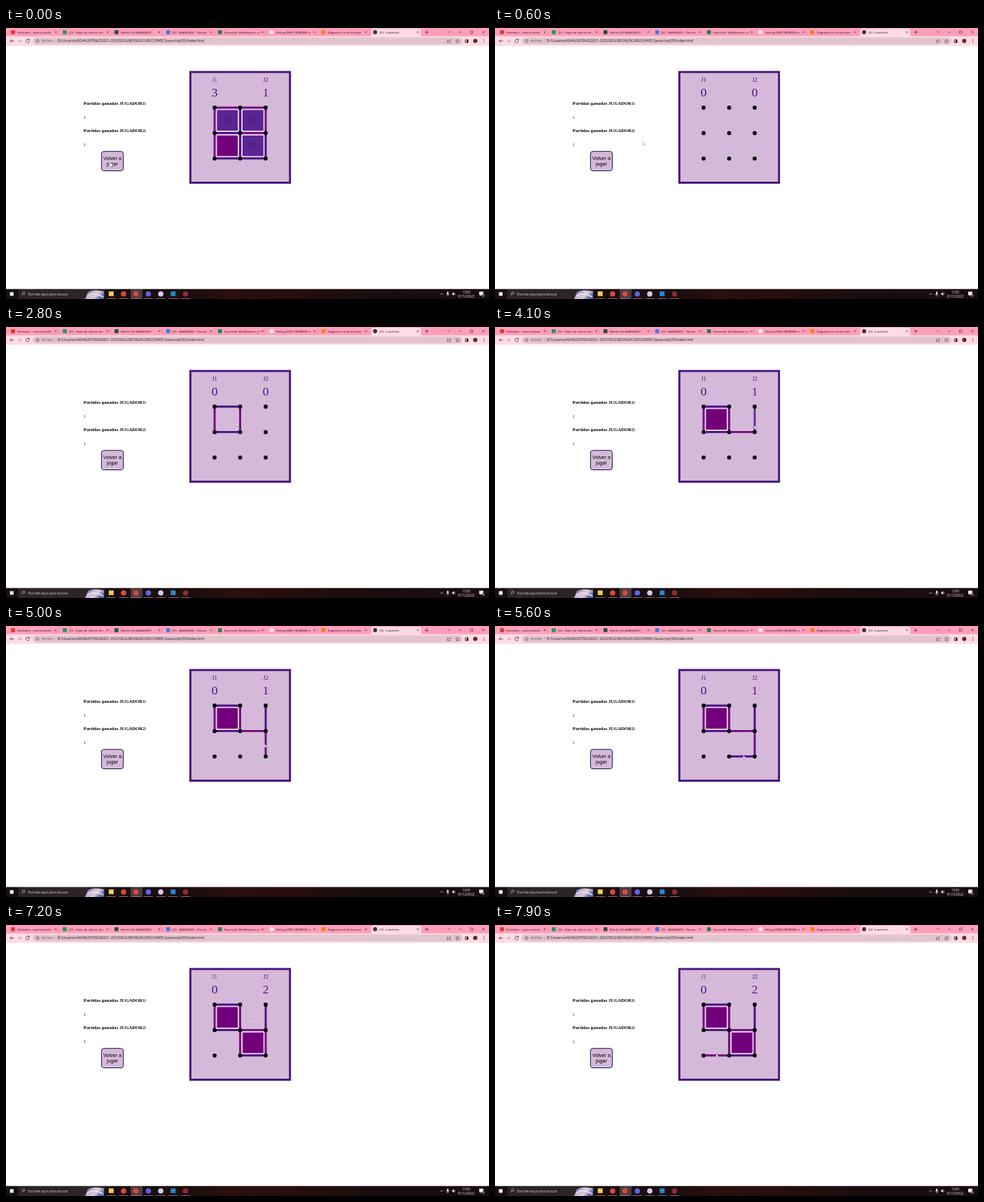
Write an HTML page that moves like this. It is 690 px wide and 388 px high and loops after 8000 ms.

```html
<!DOCTYPE html>
<html lang="es">
<head>
<meta charset="utf-8">
<title>JS3</title>
<style>
html, body { margin: 0; width: 100%; height: 100%; overflow: hidden; background: #fff; }
svg { display: block; width: 690px; height: 388px; }
text { white-space: pre; }
.ui { font-family: "Open Sans", "Noto Sans", sans-serif; }
.serif { font-family: "Liberation Serif", serif; }
.sans { font-family: "Liberation Sans", sans-serif; }
</style>
</head>
<body>
<svg id="stage" viewBox="0 0 690 388" xmlns="http://www.w3.org/2000/svg">
  <defs>
    <linearGradient id="bar"><stop offset="0" stop-color="#17100f"/><stop offset=".38" stop-color="#1b0e0f"/><stop offset=".46" stop-color="#2a0f0c"/><stop offset=".6" stop-color="#260e0d"/><stop offset=".75" stop-color="#190d0e"/><stop offset="1" stop-color="#180e10"/></linearGradient>
    <linearGradient id="doodle" x2="1" y2=".5"><stop offset="0" stop-color="#39406f"/><stop offset=".4" stop-color="#b9b2dd"/><stop offset=".7" stop-color="#e5cdd8"/><stop offset="1" stop-color="#5565b4"/></linearGradient>
  </defs>
  <rect width="690" height="388" fill="#fff"/>
  <g id="browser"></g>
  <g id="page"></g>
  <g id="board"></g>
  <g id="taskbar"></g>
  <g id="pointer"></g>
</svg>
<script>
const NS = 'http://www.w3.org/2000/svg';
const INDIGO = '#470f86', PURPLE = '#750580', LILAC = '#d4b9d9';
const LOOP = 8000, RESET = 300;
const $ = id => document.getElementById(id);

function add(parent, tag, attrs, content) {
  const el = document.createElementNS(NS, tag);
  for (const k in attrs) el.setAttribute(k, attrs[k]);
  if (content !== undefined) el.textContent = content;
  parent.appendChild(el);
  return el;
}
const label = (g, cls, x, y, size, fill, str, more) =>
  add(g, 'text', { class: cls, x, y, 'font-size': size, fill, ...more }, str);
const rect = (g, x, y, width, height, fill, more) =>
  add(g, 'rect', { x, y, width, height, fill, ...more });
const dot = (g, cx, cy, r, fill) => add(g, 'circle', { cx, cy, r, fill });
const stroke = (g, d, color, w = 0.7) =>
  add(g, 'path', { d, fill: 'none', stroke: color, 'stroke-width': w });
const MID = { 'text-anchor': 'middle' };

function drawBrowser(g) {
  const ink = '#3c1f28', strip = '#ff9ebb', tool = '#fedbe4';
  rect(g, 0, 0, 690, 12, strip);
  rect(g, 0, 11.8, 690, 13.7, tool);
  rect(g, 38, 13.4, 614, 10.2, '#e2c4ce', { rx: 5.1 });
  add(g, 'path', { d: 'M519.5 12q2.5 0 2.5-2.5v-6q0-2.500 2.500-2.500h66q2.500 0 2.500 2.500v6q0 2.500 2.500 2.500z', fill: tool });
  const tabs = [
    ['Recibidos - marisa.veldo(', '#d93a32'],
    ['JS3 - Hojas de cálculo de i', '#1a9e55'],
    ['Boletín JS3 AVANZADO', '#20553b'],
    ['JS3 - AVANZADO - Docum', '#3b7de0'],
    ['ExpressJS: Middlewares y r', '#23824d'],
    ['Editing DWEC/README.m', '#fbeef1', true],
    ['Diagrama sin título.trazo', '#ee8213'],
    ['JS3- Cuadrilete', '#3c3538', true]
  ];
  tabs.forEach(([name, color, round], i) => {
    const x = 10 + i * 73.9;
    if (round) dot(g, x, 6, 2.9, color);
    else rect(g, x - 2.8, 3.2, 5.6, 5.6, color);
    label(g, 'ui', x + 6.2, 7.5, 4.2, '#2d1219', name);
    const c = x + 61;
    rect(g, c - 2.3, 3, 6, 6, i === 7 ? tool : strip);
    stroke(g, `M${c - 1.3} 4.7l2.6 2.6m0-2.6l-2.6 2.6`, ink, 0.6);
    if (i < 6) stroke(g, `M${c + 4} 3v6`, '#c96f8a', 0.4);
  });
  stroke(g, 'M601 3.6v5m-2.5-2.5h5', ink);
  stroke(g, 'M631 4.7l1.8 1.8 1.8-1.8M647 6h3.8M663.5 4.3h3.4v3.4h-3.4zM680.3 4.2l3.4 3.4m0-3.4l-3.4 3.4', ink, 0.6);
  stroke(g, 'M11.5 18.6H6m2.3-2.3L6 18.6l2.3 2.3', ink);
  stroke(g, 'M17 18.6h5m-2.3-2.3l2.3 2.3-2.3 2.3', '#ad8290');
  stroke(g, 'M33 17a2.5 2.5 0 1 0 .4 2.2M33.5 15.6v2h-2', ink);
  stroke(g, 'M47.2 18.6a2.1 2.1 0 1 0-4.2 0 2.1 2.1 0 1 0 4.2 0M45.1 18.3v1.5M45.1 17.1v.6', ink, 0.5);
  label(g, 'ui', 50.7, 20.2, 4.82, '#634a52', 'Archivo');
  stroke(g, 'M71.3 16v5', '#a5848f', 0.4);
  label(g, 'ui', 74, 20.2, 4.82, '#2d1219',
    'B:/Usuarios/ADA%20ITS%202021-2023/SEGUNDO%20CURSO/DWEC/Javascript/JS3/index.html');
  stroke(g, 'M632 17.7h-1.5v3.2h4.6v-1.2M632 19.4q.5-2 3-2m-1-1.2l1.4 1.2-1.4 1.2', ink, 0.5);
  stroke(g, 'M645 16l.8 1.8 2 .2-1.5 1.3.5 2-1.8-1-1.8 1 .5-2-1.5-1.3 2-.2z', ink, 0.5);
  rect(g, 655.7, 16.4, 4.8, 4.8, '#1d1316', { rx: 0.6 });
  rect(g, 656.5, 17.2, 1.6, 3.2, tool);
  dot(g, 670.4, 18.6, 3, '#711f21');
  [-2, 0, 2].forEach(d => dot(g, 682.6, 18.6 + d, 0.6, ink));
}

function drawPage(g) {
  [1, 2].forEach(n => {
    const y = 110 + (n - 1) * 39.3;
    label(g, 'serif', 110.8, y, 6.73, '#000', `Partidas ganadas JUGADOR${n}:`, { 'font-weight': 700 });
    label(g, 'serif', 110.8, y + 19.5, 5.75, '#000', '1');
  });
  rect(g, 136.4, 176.7, 31.2, 27.8, LILAC, { rx: 3.4, stroke: '#1c0f45', 'stroke-width': 1 });
  label(g, 'sans', 152, 188.9, 7.2, '#000', 'Volver a', MID);
  label(g, 'sans', 152, 197.1, 7.2, '#000', 'jugar', MID);
}

function drawTaskbar(g) {
  rect(g, 0, 373.7, 690, 14.3, 'url(#bar)');
  rect(g, 5.6, 378.2, 5.2, 5.2, '#f2f2f2');
  rect(g, 17.5, 374, 123.5, 14, '#2c2427');
  stroke(g, 'M27 379.7a1.7 1.7 0 1 0-3.4 0 1.7 1.7 0 1 0 3.4 0M24 381l-1.7 1.9', '#ddd', 0.6);
  label(g, 'ui', 31.8, 382.8, 5, '#d8d3d6', 'Escribe aquí para buscar');
  add(g, 'path', { d: 'M113 388l4-10q5-3 12-2.5l11 1.5v11z', fill: 'url(#doodle)' });
  stroke(g, 'M116 384q7-5 13-3t10 4', '#f4e6d8', 1.4);
  rect(g, 178, 374, 17, 14, '#4a3d42');
  const icons = ['#f3cd55', '#d9493c', '#d9493c', '#5a66ea', '#d9c9ee', '#2489d6', '#8f2a2d'];
  icons.forEach((c, i) => {
    const x = 150.3 + i * 17.7;
    if (i === 0 || i === 5) rect(g, x - 3.5, 377.2, 7, 6.6, c);
    else dot(g, x, 380.7, 3.8, c);
    rect(g, x - 6.5, 387.3, 13, 0.7, '#c98a9e');
  });
  stroke(g, 'M620.4 381.8l2-2 2 2', '#eee');
  rect(g, 630, 377.4, 2.2, 4.4, '#eee', { rx: 1.1 });
  stroke(g, 'M629 380.6q0 2.4 2.1 2.4t2.1-2.4M631.1 383v1.5', '#eee', 0.5);
  add(g, 'path', { d: 'M637.3 379.7h1.2l1.7-1.6v5.2l-1.7-1.6h-1.2z', fill: '#eee' });
  stroke(g, 'M641.2 379.3q1 1.4 0 2.8', '#eee', 0.5);
  label(g, 'ui', 657.5, 379.5, 4.4, '#f2eef0', '13:00', MID);
  label(g, 'ui', 657.5, 386, 4.4, '#f2eef0', '01/12/2022', MID);
  add(g, 'path', { d: 'M676 377.5h6v5h-2.5l-1.4 1.5v-1.5H676z', fill: '#eee' });
  dot(g, 681.8, 383, 2, '#70636a');
}

// Board: edges are h/v + column + row, owner 1 or 2
const px = c => 298 + c * 36.5, py = r => 114 + r * 36.4;
const ownerColor = p => p === 1 ? INDIGO : PURPLE;

const lastGame = {
  edges: { h00: 2, h10: 2, h01: 1, h11: 2, h02: 1, h12: 1, v00: 2, v10: 1, v20: 2, v01: 2, v11: 1, v21: 1 },
  cells: { '00': 1, '10': 1, '01': 2, '11': 1 }
};
const moves = [
  [1000, 'h00', 1], [1450, 'v00', 2], [2050, 'h01', 1], [2550, 'v10', 2],
  [3900, 'h11', 2], [4050, 'v20', 1], [4550, 'v21', 2], [5350, 'h12', 1],
  [5850, 'v11', 2], [7650, 'h02', 2]
];
const wins = [[3000, '00', 2], [6000, '11', 2]];

const edges = {}, cells = {}, heads = [], scores = [];

function drawBoard(g) {
  rect(g, 263.4, 63, 142.3, 158.5, LILAC, { stroke: '#47137f', 'stroke-width': 2.9 });
  for (let c = 0; c < 2; c++) for (let r = 0; r < 2; r++) {
    const cell = add(g, 'g', {});
    const box = rect(cell, px(c) + 2.9, py(r) + 2.9, 30.8, 30.6, PURPLE, { stroke: '#f6ebf7', 'stroke-width': 1 });
    const tag = label(cell, 'serif', px(c) + 18.3, py(r) + 22, 12.6, '#431278', 'J1', MID);
    cells['' + c + r] = { cell, box, tag };
  }
  for (const dir of 'hv') for (let a = 0; a < 3; a++) for (let b = 0; b < 2; b++) {
    const c = dir === 'h' ? b : a, r = dir === 'h' ? a : b;
    edges[dir + c + r] = stroke(g, `M${px(c)} ${py(r)}${dir}36.4`, INDIGO, 2.9);
  }
  for (let c = 0; c < 3; c++) for (let r = 0; r < 3; r++) dot(g, px(c), py(r), 2.9, '#000');
  [0, 1].forEach(i => {
    heads.push(label(g, 'serif', px(i * 2), 76.9, 8.7, INDIGO, 'J' + (i + 1), MID));
    scores.push(label(g, 'serif', px(i * 2), 97.8, 17.3, INDIGO, '0', MID));
  });
}

function showBoard(t) {
  const old = t < RESET;
  const lines = {}, fills = {};
  if (old) {
    for (const k in lastGame.edges) lines[k] = [lastGame.edges[k], 1];
    Object.assign(fills, lastGame.cells);
  } else {
    for (const [at, k, p] of moves) if (t >= at) lines[k] = [p, Math.min(1, 0.75 + (t - at) / 800)];
    for (const [at, k, p] of wins) if (t >= at) fills[k] = p;
  }
  for (const k in edges) {
    const [p, alpha] = lines[k] || [1, 0];
    edges[k].setAttribute('stroke', ownerColor(p));
    edges[k].setAttribute('opacity', alpha);
  }
  const points = [0, 0];
  for (const k in cells) {
    const p = fills[k], { cell, box, tag } = cells[k];
    cell.setAttribute('visibility', p ? 'visible' : 'hidden');
    if (!p) continue;
    points[p - 1]++;
    box.setAttribute('fill', p === 1 ? '#5b2592' : '#72007b');
    tag.setAttribute('opacity', p === 1 ? 1 : 0);
  }
  const second = points[1] ? '#66108a' : INDIGO;
  scores.forEach((s, i) => { s.textContent = points[i]; });
  scores[1].setAttribute('fill', second);
  heads[0].setAttribute('fill', old || t >= 6000 ? '#5f3c90' : INDIGO);
  heads[1].setAttribute('fill', second);
}

// Pointer tip: time, x, y
const path = [
  [0, 148, 192], [350, 148, 192], [950, 316, 114], [1250, 316, 114], [1450, 299, 130],
  [1600, 306.5, 126], [1850, 306.5, 126], [2050, 316, 148], [2250, 317, 148],
  [2550, 331, 138], [2800, 329, 137], [3000, 332, 137], [3400, 360, 151], [3850, 360, 151],
  [4050, 370.3, 141], [4400, 370.3, 141], [4600, 370, 168], [4950, 370, 168],
  [5350, 354.5, 185], [5650, 354.5, 185], [5850, 334, 169], [6100, 334, 169],
  [6500, 351.5, 128.5], [7200, 351.5, 128.5], [7650, 316, 184.5], [8000, 316, 184.5]
];
let arrow, hand;

function drawPointer(g) {
  const look = { fill: '#fff', stroke: '#5b4a60', 'stroke-width': 0.3 };
  arrow = add(g, 'path', { d: 'M0 0v5.2l1.2-1.1.9 1.9.8-.4-.8-1.8h1.6z', ...look });
  hand = add(g, 'path', { d: 'M0 0q.7-.6 1.2 0v2.2l2.6.6q.8.2.7 1L4 6.2H.6l-1.8-2.4q.3-.8 1.2 0z', ...look });
}

function showPointer(t) {
  let i = 1;
  while (i < path.length - 1 && t > path[i][0]) i++;
  const [t0, x0, y0] = path[i - 1], [t1, x1, y1] = path[i];
  const u = Math.min(1, (t - t0) / (t1 - t0)), e = u * u * (3 - 2 * u);
  const x = x0 + (x1 - x0) * e, y = y0 + (y1 - y0) * e;
  const onButton = x < 168 && y > 176;
  $('pointer').setAttribute('transform', `translate(${x.toFixed(2)} ${y.toFixed(2)})`);
  hand.setAttribute('visibility', onButton ? 'visible' : 'hidden');
  arrow.setAttribute('visibility', onButton ? 'hidden' : 'visible');
}

drawBrowser($('browser'));
drawPage($('page'));
drawBoard($('board'));
drawTaskbar($('taskbar'));
drawPointer($('pointer'));

function render(t) {
  showBoard(t);
  showPointer(t);
}

let start;
function tick(now) {
  if (start === undefined) start = now;
  render((now - start) % LOOP);
  requestAnimationFrame(tick);
}
render(0);
requestAnimationFrame(tick);
</script>
</body>
</html>
```
